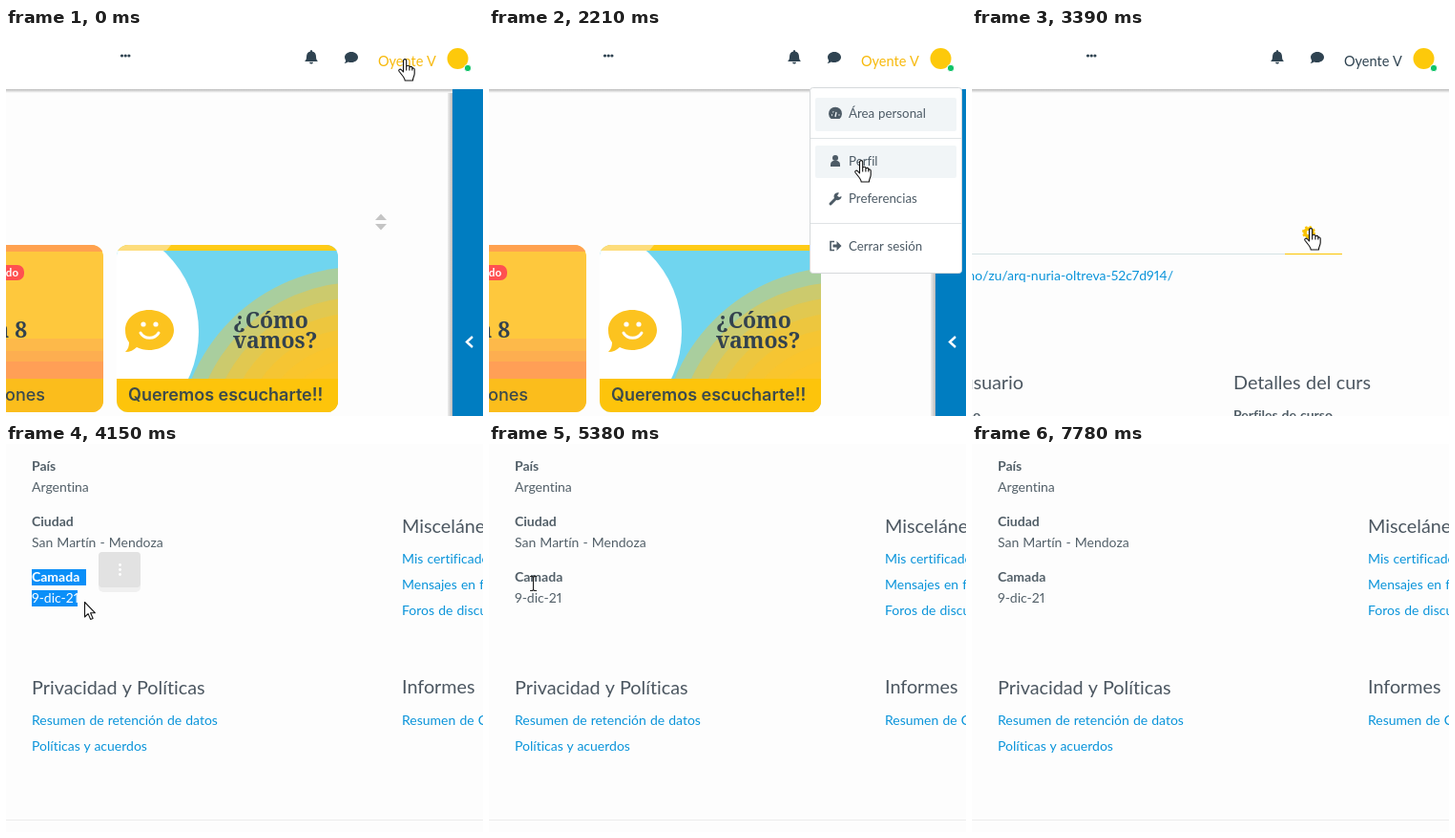
These frames come from a looping animation (500x406 px, 8.03 s). An HTML page:

```html
<!DOCTYPE html>
<html lang="es">
<head>
<meta charset="utf-8">
<title>Perfil del alumno</title>
<style>
html, body { margin: 0; width: 100%; height: 100%; overflow: hidden; background: #fdfdfd; }
svg { display: block; }
text { font: 14px Lato, sans-serif; word-spacing: .5px; font-variant-ligatures: none; font-variant-numeric: proportional-nums; }
.end { text-anchor: end; }
.bold { font-weight: 700; }
.head { font-size: 19.8px; fill: #4c5761; }
.body { fill: #525f68; }
.link { fill: #0a94da; }
.menu text { font-size: 13.3px; fill: #4d5b66; }
.serif { font: 700 23px "Noto Serif", serif; fill: #33424e; word-spacing: 0; }
.caption { font: 600 18px Inter, sans-serif; fill: #3c4a4c; word-spacing: 0; }
.dark { fill: #2f4351; }
.pointer { fill: #fff; stroke: #111; stroke-width: 1.1; stroke-linejoin: round; }
</style>
</head>
<body>
<svg width="500" height="406" viewBox="0 0 500 406">
<defs>
  <clipPath id="cardLeft"><rect x="-130" y="227" width="232" height="175" rx="12"/></clipPath>
  <clipPath id="cardRight"><rect x="116" y="227" width="232" height="175" rx="12"/></clipPath>
  <linearGradient id="fall" x2="0" y2="1">
    <stop stop-color="#bbb"/><stop offset="1" stop-color="#fdfdfd"/>
  </linearGradient>
  <linearGradient id="side"><stop stop-color="#eee"/><stop offset="1" stop-color="#bbb"/></linearGradient>
</defs>

<!-- Course page -->
<g data-show="0 3090">
  <rect x="463" y="64" width="5" height="342" fill="url(#side)"/>
  <rect x="468" y="64" width="32" height="342" fill="#007dc1"/>
  <path d="M489 323l-6 5.500 6 5.500" fill="none" stroke="#fff" stroke-width="2.400"/>
  <path d="M387 201l6-6.500 6 6.500zM387 205h12l-6 6.500z" fill="#c4c4c4"/>

  <g clip-path="url(#cardLeft)">
    <rect y="227" width="102" height="175" fill="#fec83d"/>
    <rect y="227" width="102" height="7" fill="#ffa14f"/>
    <rect y="325" width="102" height="13" fill="#fdb94a"/>
    <rect y="338" width="102" height="11" fill="#fdae50"/>
    <rect y="349" width="102" height="18" fill="#ff9f56"/>
    <rect y="367" width="102" height="35" fill="#fbbd1c"/>
    <rect x="-40" y="248" width="59" height="16" rx="7" fill="#ff5050"/>
    <text class="bold end" x="13" y="260" fill="#fff" style="font-size:11.500px">do</text>
    <text class="serif end" x="22" y="324">a 8</text>
    <text class="caption end" x="41" y="390" style="font-weight:500">ones</text>
  </g>

  <g clip-path="url(#cardRight)">
    <rect x="116" y="227" width="232" height="175" fill="#70d5ef"/>
    <g id="rings" fill="#ffc423"></g>
    <circle cx="86" cy="318" r="116" fill="#fff"/>
    <rect x="116" y="227" width="232" height="6" fill="#ffcb17"/>
    <path d="M116 227h57l-5 6h-52z" fill="#fddd7c"/>
    <rect x="116" y="367" width="232" height="35" fill="#fdc40b"/>
    <path d="M150 295c14 0 26 9 26 21s-12 21-26 21c-5 0-9-1-13-3-3 3-7 5-12 5 3-3 4-6 4-10-3-4-4-8-4-13 0-12 11-21 25-21z" fill="#fcc31f"/>
    <g fill="#fff"><circle cx="144" cy="310" r="2.600"/><circle cx="157" cy="310" r="2.600"/></g>
    <path d="M141 319c4 7 15 7 19 0" fill="none" stroke="#fff" stroke-width="3" stroke-linecap="round"/>
    <text class="serif" x="238" y="314">¿Cómo</text>
    <text class="serif" x="238" y="335">vamos?</text>
    <text class="caption" x="128" y="390">Queremos escucharte!!</text>
  </g>
</g>

<!-- Profile page, top -->
<g id="profile" data-show="3090 4150">
  <path d="M0 236.500H328" stroke="#d5e2e4"/>
  <path d="M328 236.500H388" stroke="#fbc400"/>
  <circle cx="353" cy="214" r="4" fill="none" stroke="#fbc400" stroke-width="3.500"/>
  <circle cx="353" cy="214" r="6" fill="none" stroke="#fbc400" stroke-width="2" stroke-dasharray="2.400 2.310"/>
  <text class="link end" x="211" y="264">mo/zu/arq-nuria-oltreva-52c7d914/</text>
  <text class="head end" x="54" y="378">usuario</text>
  <text class="head" x="274" y="378">Detalles del curs</text>
  <text class="body bold end" x="9" y="410">no</text>
  <text class="body bold" x="274" y="410">Perfiles de curso</text>
</g>

<!-- Header -->
<g data-show="0 4150">
  <rect width="500" height="64" fill="#fff"/>
  <rect y="64" width="500" height="4" fill="url(#fall)" data-show="3090 4150"/>
  <rect y="64" width="468" height="4" fill="url(#fall)" data-show="0 3090"/>
  <g class="dark">
    <circle cx="121.500" cy="29" r="1.600"/><circle cx="125.200" cy="29" r="1.600"/><circle cx="128.900" cy="29" r="1.600"/>
    <path d="M320 23c1 0 1 1 1 1.400 3 .6 4 3 4 5.600 0 3 1 4 2 5h-14c1-1 2-2 2-5 0-2.600 1-5 4-5.600 0-.4 0-1.400 1-1.400zM318 35.700h4c0 2.400-4 2.400-4 0z"/>
    <path d="M362 25c4 0 7 2.500 7 5.500s-3 5.500-7 5.500c-1.300 0-2.400-.2-3.400-.6-1 .9-2.300 1.400-4 1.500 1-1 1.500-2 1.600-3-.8-1-1.200-2.200-1.200-3.400 0-3 3-5.500 7-5.500z"/>
  </g>
  <text id="user" x="390" y="40" style="font-size:14.500px">Oyente V</text>
  <circle cx="473.500" cy="32" r="11" fill="#fdc90b"/>
  <circle cx="484" cy="42" r="3.700" fill="#10c469" stroke="#fff"/>
</g>

<!-- User menu -->
<g class="menu" data-show="150 3090">
  <rect x="336.500" y="62.500" width="159" height="194" rx="3" fill="#fff" stroke="#d6d9db"/>
  <rect x="342" y="73" width="148" height="35" rx="2" fill="#f1f5f7"/>
  <rect x="342" y="123" width="148" height="34" rx="2" fill="#f1f5f7" data-show="1230 3090"/>
  <path d="M337 115.500h158M337 204.500h158" stroke="#dfe3e5"/>
  <g fill="#4d5b66">
    <path d="M358.500 95a7 7 0 1 1 9 0z"/>
    <path d="M363 93l1-5M359 91h1M360.500 87.500l.7.700M366.500 91h1" stroke="#f1f5f7" stroke-width="1.300"/>
    <circle cx="363" cy="136" r="3"/>
    <path d="M358 145v-2c0-3 2-4 3-4h4c1 0 3 1 3 4v2z"/>
    <path d="M358 184l6-6" stroke="#4d5b66" stroke-width="3" stroke-linecap="round"/>
    <path d="M367 172.500a4 4 0 1 0 2.500 3.500l-2.500 1-2-1.500z"/>
    <path d="M362 223.500h-4v9h4" fill="none" stroke="#4d5b66" stroke-width="1.600"/>
    <path d="M360.500 226.500h4v-3.500l5 5-5 5v-3.500h-4z"/>
  </g>
  <text x="377" y="94">Área personal</text>
  <text x="377" y="144">Perfil</text>
  <text x="377" y="183">Preferencias</text>
  <text x="377" y="233">Cerrar sesión</text>
</g>

<!-- Profile page, bottom -->
<g data-show="4150 8030">
  <text class="body bold" x="27" y="28">País</text>
  <text class="body" x="27" y="50">Argentina</text>
  <text class="body bold" x="27" y="86">Ciudad</text>
  <text class="body" x="27" y="108">San Martín - Mendoza</text>
  <text class="body bold" x="27" y="144">Camada</text>
  <text class="body" x="27" y="166">9-dic-21</text>
  <text class="head" x="27" y="262">Privacidad y Políticas</text>
  <text class="link" x="27" y="294">Resumen de retención de datos</text>
  <text class="link" x="27" y="321">Políticas y acuerdos</text>
  <text class="head" x="415" y="93">Misceláneos</text>
  <text class="link" x="415" y="125">Mis certificados</text>
  <text class="link" x="415" y="152">Mensajes en foros</text>
  <text class="link" x="415" y="179">Foros de discusión</text>
  <text class="head" x="415" y="261">Informes</text>
  <text class="link" x="415" y="294">Resumen de Calificaciones</text>
  <path d="M0 393.500h500" stroke="#ececec"/>
</g>
<g data-show="4150 4810">
  <path d="M27 131h57v17H27zM27 153h48v17H27z" fill="#0a8ff8"/>
  <text class="bold" x="27" y="144" fill="#fff">Camada</text>
  <text x="27" y="166" fill="#fff">9-dic-21</text>
  <rect x="97" y="117" width="44" height="38" rx="5" fill="#f0f0f0"/>
  <rect id="more" x="97" y="113" width="44" height="37" rx="4"/>
  <g fill="#fff"><circle cx="119.500" cy="126.500" r="1.400"/><circle cx="119.500" cy="131.500" r="1.400"/><circle cx="119.500" cy="136.500" r="1.400"/></g>
</g>

<g id="cursor">
  <g id="hand" class="pointer">
    <path d="M5.500 14V2.200a1.600 1.600 0 0 1 3.200 0v6.300c.3-1.600 3-1.600 3.200 0v.8c.4-1.400 2.800-1.200 2.900.3v.9c.5-1 2.400-.8 2.400.8v4.200c0 3-1.800 4-1.800 7.500H7.200C7 20 4.500 18 1 13.200c-1-1.500 1-2.800 2.300-1.600z"/>
    <path d="M8.700 8.500v4M11.900 9.500v3M14.800 10.500v2" fill="none"/>
  </g>
  <path id="arrow" class="pointer" d="M.5.500v15.500l3.600-3.400 2.500 5.800 2.500-1-2.500-5.700h4.700z"/>
  <path id="beam" d="M0 .500h2.500l1 1 1-1H7M3.500 1.500v13M0 15.500h2.500l1-1 1 1H7" fill="none" stroke="#222" stroke-width="1.200"/>
</g>
</svg>

<script>
const LOOP = 8030;
const byId = id => document.getElementById(id);
const timed = [...document.querySelectorAll('[data-show]')].map(el => {
  const [from, to] = el.dataset.show.split(' ').map(Number);
  return { el, from, to };
});
const shapes = ['hand', 'arrow', 'beam'];

// start time, shape, left, top
const stops = [
  [0, 'hand', 411, 32], [550, 'hand', 409, 47], [810, 'hand', 408, 53], [960, 'hand', 393, 86],
  [1080, 'arrow', 396, 116], [1230, 'hand', 388, 129], [1350, 'hand', 385, 141],
  [1600, 'hand', 383, 138], [1750, 'hand', 380, 138], [1900, 'hand', 386, 138], [2210, 'hand', 383, 138],
  [3090, 'hand', 348, 209],
  [4150, 'arrow', 82, 165], [4440, 'arrow', 88, 166], [4560, 'arrow', 94, 166], [5080, 'arrow', 92, 165],
  [5230, 'beam', 69, 137], [5380, 'beam', 43, 138], [5530, 'arrow', 60, 183], [5660, 'beam', 75, 125],
  [5810, 'beam', 54, 131], [5960, 'beam', 65, 147],
  [7130, 'arrow', 120, 185], [7255, 'arrow', 205, 240], [7380, 'arrow', 300, 305],
  [7505, 'arrow', 390, 360], [7630, 'arrow', 465, 401], [7780, 'none', 0, 0]
];

for (let r = 190; r >= 90; r -= 16) {
  byId('rings').innerHTML += `<circle cx="370" cy="440" r="${r}" opacity=".4"/>`;
}

function draw(t) {
  for (const { el, from, to } of timed) el.style.display = t >= from && t < to ? '' : 'none';
  byId('user').style.fill = t < 3090 ? '#f7b90b' : '#2f4351';
  byId('profile').style.opacity = t < 3220 ? 0.65 : t < 3390 ? 0.88 : 1;
  byId('more').style.fill = t < 4300 ? '#e2e2e2' : '#d4d4d4';

  const [, shape, x, y] = stops.findLast(stop => stop[0] <= t);
  byId('cursor').setAttribute('transform', `translate(${x} ${y})`);
  for (const id of shapes) byId(id).style.display = id === shape ? '' : 'none';
}

const start = performance.now();
function tick() {
  draw((performance.now() - start) % LOOP);
  requestAnimationFrame(tick);
}
tick();
</script>
</body>
</html>
```
